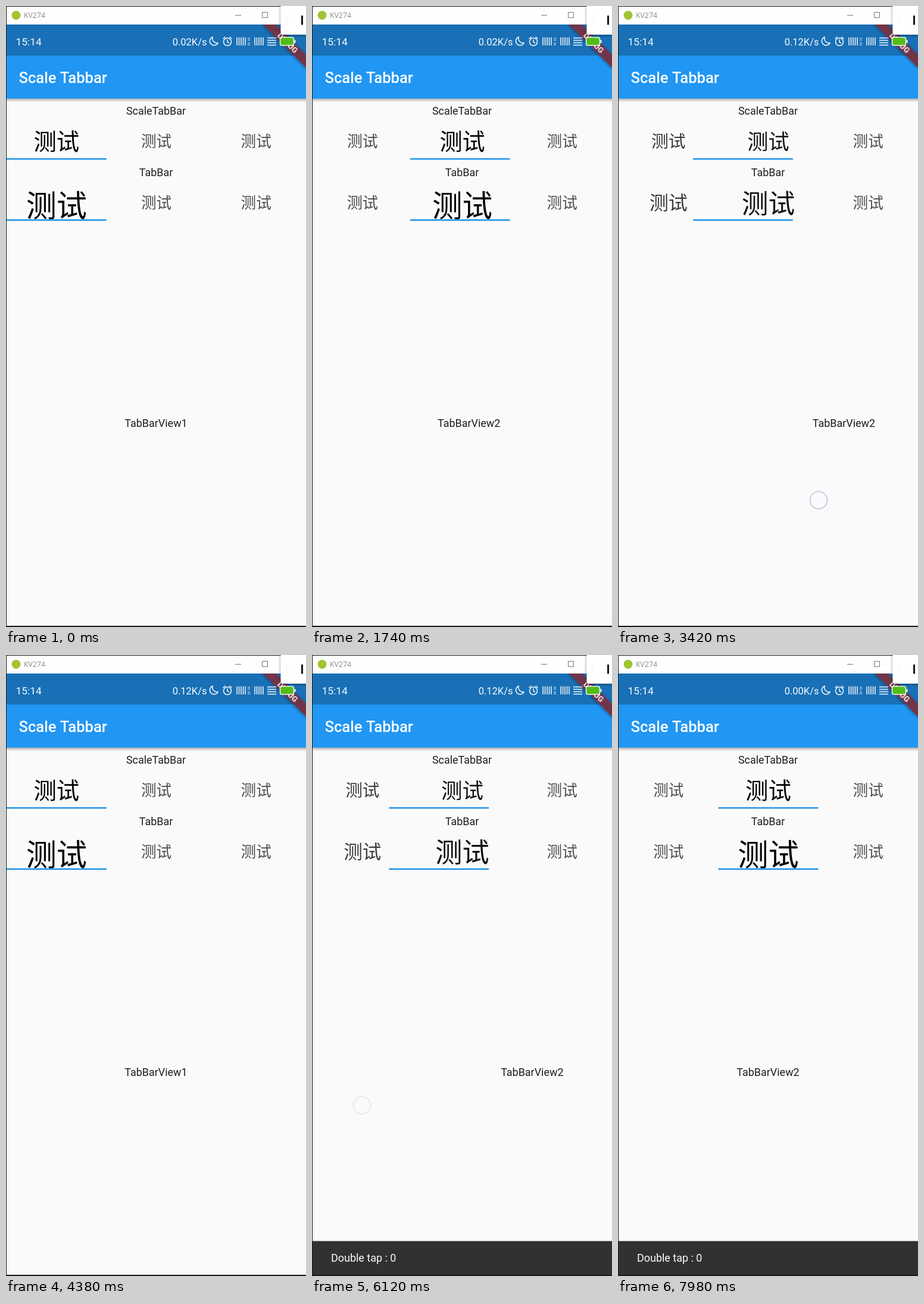
These frames come from a looping animation (504x1040 px, 8 s). An HTML page:

```html
<!DOCTYPE html>
<html lang="zh-CN">
<head>
<meta charset="utf-8">
<title>Scale Tabbar</title>
<style>
  html, body { margin: 0; width: 100%; height: 100%; overflow: hidden; background: #fafafa; }
  svg { display: block; width: 504px; height: 1040px; font-family: Roboto, sans-serif; }
  .body { font-size: 17.94px; fill: #1e1e1e; text-anchor: middle; }
  .tab { font: 300 25.6px "Noto Sans CJK SC", "Noto Sans CJK", sans-serif; text-anchor: middle; }
  .line { fill: none; stroke: #f4f8fc; stroke-width: 1.5; }
</style>
</head>
<body>
<svg viewBox="0 0 504 1040">
  <defs>
    <linearGradient id="shade" x2="0" y2="1">
      <stop offset="0" stop-color="#000" stop-opacity=".3"/>
      <stop offset="1" stop-color="#000" stop-opacity="0"/>
    </linearGradient>
    <filter id="soft" x="-30%" y="-30%" width="160%" height="160%">
      <feDropShadow dx="0" dy="1" stdDeviation="2.5" flood-opacity=".45"/>
    </filter>
  </defs>
  <rect width="504" height="1040" fill="#fafafa"/>

  <text class="body" x="252" y="182">ScaleTabBar</text>
  <text class="body" x="252" y="284.5">TabBar</text>
  <g id="pages"></g>
  <rect id="highlight" y="196" width="167.7" height="60" rx="12" fill="#fa7a70"/>
  <g id="tabs"></g>
  <rect class="bar" y="254.8" width="167.7" height="2.6" fill="#2196e6"/>
  <rect class="bar" y="357.2" width="167.7" height="2.6" fill="#2196e6"/>

  <g id="snack">
    <rect x="1" width="503" height="60" fill="#303231"/>
    <text id="snackText" x="32" y="34" font-size="17.94" fill="#fafafa">Double tap : 0</text>
  </g>

  <rect x="1" y="155" width="503" height="6" fill="url(#shade)"/>
  <rect x="1" y="83" width="503" height="72" fill="#2196f3"/>
  <rect x="1" y="31" width="503" height="52" fill="#1970b6"/>
  <text x="21.5" y="128.5" font-size="25.6" font-weight="500" word-spacing=".7" fill="#fff">Scale Tabbar</text>

  <g transform="translate(504 31) rotate(45)">
    <rect x="-52" y="35.8" width="104" height="15.4" fill="#70354a" filter="url(#soft)"/>
    <text y="48.2" font-size="13.1" font-weight="900" fill="#e2d4de" text-anchor="middle">DEBUG</text>
  </g>

  <g font-size="16.5" fill="#f8fbfd">
    <text x="16.5" y="66" font-size="17.4">15:14</text>
    <text id="speed" x="337.5" y="66" text-anchor="end"></text>
  </g>
  <g class="line">
    <path d="M347 52a7.2 7.2 0 1 0 9 10a8 8 0 0 1-9-10z"/>
    <circle cx="372" cy="60" r="6.5"/>
    <path d="M372 56v4.500l3 1.500M364.500 55l4-3.500M379.500 55l-4-3.500"/>
    <path id="signal"/>
    <path d="M406 54h4M406 57h4M406 62h4M406 65h4" stroke-width="1.2"/>
    <path d="M439 53.500h15M439 57.500h15M439 61.500h15M439 65.500h15"/>
    <rect x="460.500" y="52.500" width="23" height="13.500" rx="3" fill="#52bd16"/>
    <path d="M485.500 57v5" stroke-width="2"/>
  </g>

  <rect x="1" y="1" width="503" height="30" fill="#fff"/>
  <circle cx="17" cy="15.500" r="7.500" fill="#a0c432"/>
  <text x="30" y="20" font-size="12.300" fill="#8a8a80" style="font-family:'Open Sans',sans-serif">KV274</text>
  <path d="M385 15.500h10M430.500 10.500h9v9h-9z" fill="none" stroke="#777"/>
  <path d="M0 .5H504M.5 0V1040" stroke="#181818"/>
  <path d="M0 1039H504" stroke="#181818" stroke-width="2"/>
  <path d="M461.500 -6H520V48H467q-5.500 0-5.500-5.500z" fill="#fff" filter="url(#soft)"/>
  <path d="M469 16.500h6M469 20.500h6M469 24.500h6M469 28.500h6" stroke="#f4f4ea"/>
  <path d="M497.500 16v15.500" stroke="#151515" stroke-width="3"/>

  <circle id="touch"/>
</svg>
<script>
const LOOP = 8000, WIDTH = 503, TAB = WIDTH / 3, DRAG = 250, SETTLE = 0.009, FADE = 130;

const swipes = [
  { start: 1150, to: 1, from: [350, 700], end: [98, 722] },
  { start: 1950, to: 2, from: [345, 728], end: [93, 748] },
  { start: 2698, to: 1, from: [200, 794], end: [452, 845] },
  { start: 3230, to: 0, from: [190, 802], end: [442, 846] },
  { start: 5787, to: 1, from: [336, 738], end: [84, 754] }
];
const taps = [
  { start: 4600, stop: 4700, at: [84, 232] },
  { start: 4830, stop: 4930, at: [84, 232] },
  { start: 6900, stop: 6990, at: [228, 236] },
  { start: 7110, stop: 7260, at: [228, 236] }
];
const highlights = [
  { tab: 0, start: 4640, stop: 4960 },
  { tab: 1, start: 6920, stop: 7300 }
];
const SNACK_START = 4960;

const $ = id => document.getElementById(id);
const clamp = v => Math.max(0, Math.min(1, v));
const lerp = (a, b, u) => a + (b - a) * u;
const set = (el, attrs) => { for (const k in attrs) el.setAttribute(k, attrs[k]); };

function addText(parent, className, content, attrs) {
  const el = document.createElementNS('http://www.w3.org/2000/svg', 'text');
  el.textContent = content;
  set(el, { class: className, ...attrs });
  $(parent).append(el);
  return el;
}

const pages = [1, 2, 3].map(n => addText('pages', 'body', 'TabBarView' + n, { y: 705 }));
const rows = [{ y: 226.5, grow: 0.5 }, { y: 329, grow: 1 }];
const tabs = rows.flatMap(row => [0, 1, 2].map(index =>
  ({ ...row, index, el: addText('tabs', 'tab', '测试', { y: 9.7 }) })));
const bars = document.querySelectorAll('.bar');

$('signal').setAttribute('d', [388, 418].flatMap(x =>
  [0, 1, 2, 3, 4].map(i => `M${x + i * 3.5} 52.5v13.5`)).join(''));

// Position in pages: follows the finger, then settles exponentially.
function pageAt(t) {
  let p = 0;
  swipes.forEach((s, i) => {
    if (t < s.start) return;
    const now = Math.min(t, swipes[i + 1]?.start ?? t) - s.start;
    const u = clamp(now / DRAG);
    p += (s.from[0] - s.end[0]) / WIDTH * u * u;
    if (now > DRAG) p = s.to + (p - s.to) * Math.exp(-(now - DRAG) * SETTLE);
  });
  return p;
}

function drawTouch(t) {
  const touch = $('touch');
  const swipe = swipes.find(s => t >= s.start && t < s.start + DRAG + FADE);
  const tap = taps.find(s => t >= s.start && t < s.stop + FADE);
  if (swipe) {
    const u = clamp((t - swipe.start) / DRAG) ** 2;
    set(touch, {
      cx: lerp(swipe.from[0], swipe.end[0], u), cy: lerp(swipe.from[1], swipe.end[1], u), r: 14.5,
      fill: '#fafafd', stroke: '#c9c9e0', 'stroke-width': 1.8,
      opacity: 1 - clamp((t - swipe.start - DRAG) / FADE)
    });
  } else if (tap) {
    set(touch, {
      cx: tap.at[0], cy: tap.at[1], r: 17, fill: '#46285c', stroke: 'none',
      opacity: 0.4 * (1 - clamp((t - tap.stop) / FADE))
    });
  } else {
    set(touch, { opacity: 0 });
  }
}

function draw(t) {
  const p = pageAt(t);
  pages.forEach((el, i) => set(el, { x: 252 + (i - p) * WIDTH }));
  bars.forEach(el => set(el, { x: 1 + p * TAB }));

  for (const { el, index, y, grow } of tabs) {
    const active = clamp(1 - Math.abs(p - index));
    const scale = 1 + grow * active;
    const overflow = Math.max(0, (34.5 * scale - 59) / 2);
    const ink = Math.round(lerp(78, 0, active));
    set(el, {
      transform: `translate(${1 + (index + 0.5) * TAB} ${y + overflow}) scale(${scale})`,
      fill: `rgb(${ink},${ink},${ink})`
    });
  }

  const lit = highlights.find(h => t >= h.start && t < h.stop + 200);
  set($('highlight'), {
    x: 1 + (lit ? lit.tab : 0) * TAB,
    opacity: lit ? clamp((t - lit.start) / 150) * (1 - clamp((t - lit.stop) / 200)) : 0
  });

  const rise = clamp((t - SNACK_START) / 250);
  const eased = 1 - (1 - rise) ** 3;
  set($('snack'), { transform: `translate(0 ${1038 - 56.5 * eased})`, opacity: rise > 0 ? 1 : 0 });
  set($('snackText'), { opacity: clamp((rise - 0.4) / 0.6) });

  $('speed').textContent = (t < 2300 ? '0.02' : t < 6300 ? '0.12' : '0.00') + 'K/s';
  drawTouch(t);
}

const begin = performance.now();
function tick() {
  draw((performance.now() - begin) % LOOP);
  requestAnimationFrame(tick);
}
tick();
</script>
</body>
</html>
```
